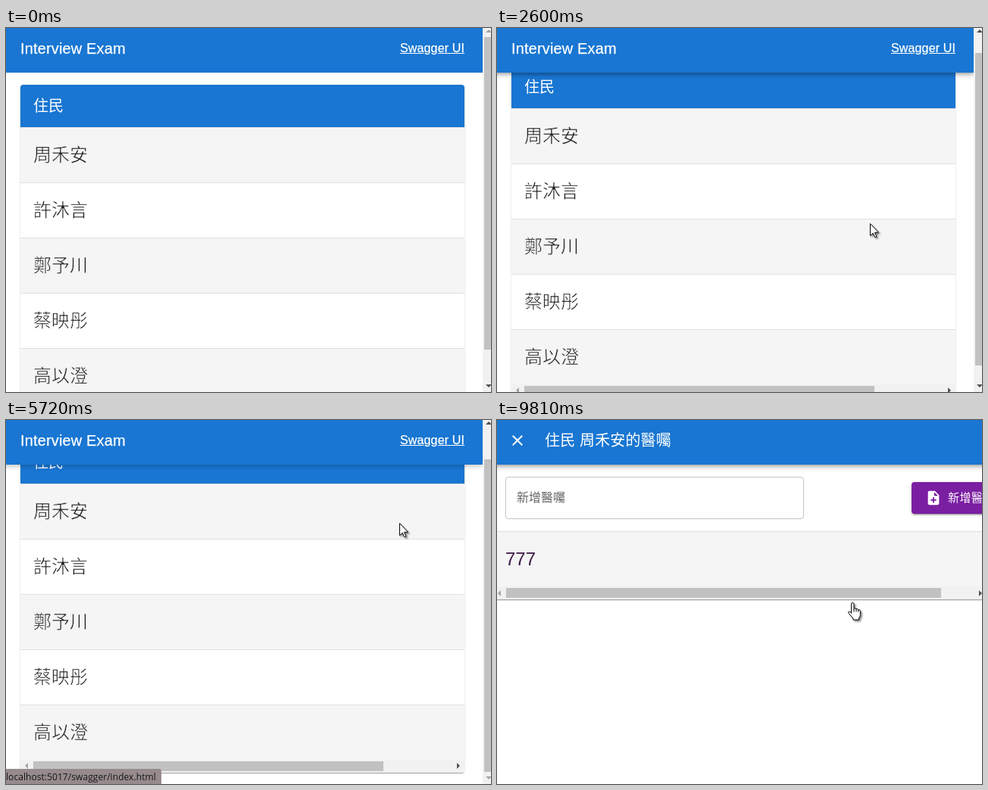
Animation, 640 px wide and 481 px high, one loop 9870 ms. Source, as an HTML page:

```html
<!DOCTYPE html>
<html lang="zh-Hant">
<head>
<meta charset="utf-8">
<title>Interview Exam</title>
<style>
  html, body { margin: 0; width: 100%; height: 100%; overflow: hidden; background: #fff; }
  #stage {
    position: relative; width: 640px; height: 481px; overflow: hidden; background: #fff;
    font: 300 24px "Liberation Sans", "Noto Sans CJK TC", sans-serif; color: rgba(0,0,0,.87);
  }
  #stage div, #stage svg { position: absolute; box-sizing: border-box; white-space: nowrap; }
  #page { width: 629px; height: 481px; overflow: hidden; }
  .bar { left: -20px; top: -20px; width: 649px; height: 79px; background: #1976d2; }
  .lift { box-shadow: 0 2px 4px -1px rgba(0,0,0,.2), 0 4px 5px rgba(0,0,0,.14), 0 1px 10px rgba(0,0,0,.12); }
  .title { top: 0; font-size: 20px; line-height: 54px; letter-spacing: .15px; color: #fff; }
  .link { left: 520px; top: 0; font-size: 16px; line-height: 53px; letter-spacing: .15px; color: #fff; text-decoration: underline; }
  .crisp { -webkit-text-stroke: .25px #fff; }
  .card { box-shadow: 0 2px 1px -1px rgba(0,0,0,.2), 0 1px 1px rgba(0,0,0,.14), 0 1px 3px rgba(0,0,0,.12); }
  #card, #cardEdge { left: 19px; top: 75px; width: 586px; height: 438px; border-radius: 4px; }
  #card { overflow: hidden; background: #fff; }
  #table { width: 700px; height: 421px; }
  .head { width: 700px; height: 57px; background: #1976d2; border-bottom: 1px solid #e0e0e0; color: #fff; font-size: 20px; line-height: 56px; }
  .row { --bg: #fff; width: 700px; height: 73px; background: var(--bg); border-bottom: 1px solid #e0e0e0; line-height: 72px; }
  .row:nth-child(even) { --bg: #f5f5f5; }
  .row:last-child { height: 72px; border: 0; }
  .cell { left: 17px; }
  /* a stroke in the row colour slims the glyphs to a light weight */
  .row .cell { color: #1c1c1c; -webkit-text-stroke: .6px var(--bg); }
  .halo { left: 644px; top: 16px; width: 40px; height: 40px; border-radius: 50%; background: rgba(0,0,0,.04); }
  .doc { left: 652px; top: 24px; fill: #757575; }
  .track { background: #f1f1f1; }
  .thumb { background: #c1c1c1; }
  .arrow { background: #505050; }
  .side { width: 4px; height: 8px; }
  .flat { left: 633px; width: 8px; height: 4px; }
  .up { clip-path: polygon(0 100%, 50% 0, 100% 100%); }
  .down { clip-path: polygon(0 0, 100% 0, 50% 100%); }
  .left { clip-path: polygon(100% 0, 0 50%, 100% 100%); }
  .right { clip-path: polygon(0 0, 100% 50%, 0 100%); }
  #status {
    left: 0; top: 461px; width: 205px; height: 20px; border-radius: 0 3px 0 0; background: #978a8d;
    color: #161616; font: 400 12px/21px "Open Sans", sans-serif; letter-spacing: .06px;
  }
  #shade { width: 640px; height: 481px; background: #000; }
  #dialog { width: 640px; height: 481px; background: #fff; overflow: hidden; }
  .field { left: 11px; top: 75px; width: 394px; height: 56px; border: 1px solid rgba(0,0,0,.23); border-radius: 4px; padding-left: 14px; font-size: 16px; line-height: 53px; color: rgba(0,0,0,.6); }
  .add {
    left: 547px; top: 82px; width: 137px; height: 42px; border-radius: 4px; background: #7b1fa2; color: #fff;
    font-size: 15px; line-height: 42px; letter-spacing: .4px; padding-left: 48px;
    box-shadow: 0 3px 1px -2px rgba(0,0,0,.2), 0 2px 2px rgba(0,0,0,.14), 0 1px 5px rgba(0,0,0,.12);
  }
  .order { left: -5px; top: 147px; width: 651px; height: 90px; border-top: 1px solid #e0e0e0; background: #f5f5f5; padding-left: 16px; line-height: 72px; color: #3f1a48; }
  #press { width: 30px; height: 30px; margin: -15px; border-radius: 50%; background: #ffff70; mix-blend-mode: multiply; }
  .cursor { overflow: visible; filter: drop-shadow(2px 2px 1.2px rgba(0,0,0,.45)); fill: #fff; stroke: #000; }
</style>
</head>
<body>
<div id="stage">
  <div id="page">
    <div id="cardEdge" class="card"></div>
    <div id="card">
      <div id="table"></div>
      <div class="track" style="top:421px;width:586px;height:17px"></div>
      <div id="hThumb" class="thumb" style="left:17px;top:423px;width:462px;height:13px"></div>
      <div id="hLeft" class="arrow side left" style="left:6px;top:425px"></div>
      <div id="hRight" class="arrow side right" style="left:576px;top:425px"></div>
    </div>
    <div id="barShadow" class="bar lift"></div>
    <div class="bar"></div>
    <div class="title crisp" style="left:19px">Interview Exam</div>
    <div class="link crisp">Swagger UI</div>
  </div>
  <div class="track" style="left:629px;width:17px;height:481px"></div>
  <div id="vThumb" class="thumb" style="left:631px;top:12px;width:13px;height:413px"></div>
  <div id="vUp" class="arrow flat up" style="top:2px"></div>
  <div id="vDown" class="arrow flat down" style="top:471px"></div>
  <div id="status">localhost:5017/swagger/index.html</div>
  <div id="shade"></div>
  <div id="dialog">
    <div class="bar lift" style="width:680px"></div>
    <svg style="left:20px;top:20px" width="14" height="14" stroke="#fff" stroke-width="2"><path d="M.7.7l12.6 12.6M13.3.7L.7 13.3"/></svg>
    <div class="title" id="dialogTitle" style="left:63px"></div>
    <div class="field">新增醫囑</div>
    <div class="add" id="add">新增醫囑</div>
    <div class="order card">777</div>
    <div class="track" style="top:220px;width:640px;height:17px"></div>
    <div class="thumb" style="left:12px;top:222px;width:574px;height:13px"></div>
    <div class="arrow side left" style="left:1px;top:225px;background:#a3a3a3"></div>
    <div class="arrow side right" style="left:636px;top:225px"></div>
  </div>
  <div id="press"></div>
  <svg id="arrow" class="cursor" width="14" height="20"><path d="M.5.5V16.6L4.2 13.1 6.8 18.8 9 17.8 6.5 12.2H11.6Z"/></svg>
  <svg id="hand" class="cursor" width="18" height="24"><path d="M4.6 14.5V2.1a1.7 1.7 0 0 1 3.4 0V8.2q1.7-1.1 3 .6 1.7-.9 2.8.9 2.6-.5 2.6 2V16.5q0 2.7-1.8 4.3V23H7V21Q4.6 18.4 1.2 14.6 0 12.6 1.6 11.9 3 11.7 4.6 14.5ZM8 8.2V12.5M11 8.8V12.5M13.8 9.7V12.7"/></svg>
</div>
<script>
const LOOP = 9870, TICK = 70, PHASE = 30;
const MAX_V = 47, MAX_H = 114, THUMB_RUN = 90, GRAB_X = 452;
const NAMES = ['周禾安', '許沐言', '鄭予川', '蔡映彤', '高以澄'];
const PAPER = 'M14 2H6a2 2 0 0 0-2 2v16a2 2 0 0 0 2 2h12a2 2 0 0 0 2-2V8zM13 9V3.5L18.5 9z';
const LINES = 'M8 12h8v2H8zM8 16h8v2H8z';
const PLUS = 'M11 11h2v3h3v2h-3v3h-2v-3H8v-2h3z';

const $ = id => document.getElementById(id);
const icon = (mark, size, attrs) =>
  `<svg ${attrs} width="${size}" height="${size}" viewBox="0 0 24 24"><path fill-rule="evenodd" d="${PAPER}${mark}"/></svg>`;

$('table').innerHTML =
  '<div class="head"><div class="cell">住民</div><div style="left:644px">醫囑</div></div>' +
  NAMES.map((name, i) =>
    `<div class="row" style="top:${57 + 73 * i}px"><div class="cell">${name}</div>` +
    (i ? '' : '<div class="halo" id="halo"></div>') + icon(LINES, 24, 'class="doc"') + '</div>').join('');
$('dialogTitle').textContent = `住民 ${NAMES[0]}的醫囑`;
$('add').innerHTML += icon(PLUS, 22, 'style="left:18px;top:10px" fill="#fff"');

// Each wheel turn runs to the opposite end of the page
const WHEEL_TURNS = [690, 1832, 2500, 3303, 5500], WHEEL_TIME = 160;

const ENTRY = { x: 598, y: 456 };
const MOVES = [
  { from: 180, to: 450, x: 492, y: 258 },
  { from: 3560, to: 4370, x: 540, y: 15 },
  { from: 5230, to: 5400, x: 519, y: 136 },
  { from: 5720, to: 6180, x: GRAB_X + 1, y: 448 },
  { from: 7060, to: 7690, x: 582, y: 450 },
  { from: 7900, to: 8180, x: 545, y: 106 },
  { from: 8380, to: 8580, x: 572, y: 112 },
  { from: 9200, to: 9810, x: 469, y: 241 }
];

const clamp = (v, a = 0, b = 1) => Math.min(b, Math.max(a, v));
const ramp = (t, a, b) => clamp((t - a) / (b - a));
const easeOut = (u, power) => 1 - (1 - u) ** power;
const show = (id, on) => { $(id).style.display = on ? '' : 'none'; };
const fade = (id, opacity) => { $(id).style.opacity = opacity; };
const shift = (id, x, y) => { $(id).style.transform = `translate(${Math.round(x)}px,${Math.round(y)}px)`; };
const ink = (id, active) => { $(id).style.background = active ? '#505050' : '#a3a3a3'; };

// The screen refreshes in fixed ticks
const snap = t => Math.max(0, Math.floor((t - PHASE) / TICK) * TICK + PHASE);

const scrollAt = t => Math.round(WHEEL_TURNS.reduce((y, start, i) =>
  y + (i % 2 ? -MAX_V : MAX_V) * easeOut(ramp(t, start, start + WHEEL_TIME), 2), 0));

function pointerAt(t) {
  let { x, y } = ENTRY;
  for (const m of MOVES) {
    const u = easeOut(ramp(t, m.from, m.to), 3);
    x += (m.x - x) * u;
    y += (m.y - y) * u;
  }
  const pull = Math.sin(Math.PI * ramp(t, 6720, 6950));
  return { x: x - 107 * pull, y: y + 6 * pull };
}

function draw(now) {
  const t = snap(now);
  const { x, y } = pointerAt(t);

  const scroll = scrollAt(t);
  shift('card', 0, -scroll);
  shift('cardEdge', 0, -scroll);
  shift('vThumb', 0, scroll * .85);
  ink('vUp', scroll > 0);
  ink('vDown', scroll < MAX_V);
  fade('barShadow', ramp(t, 730, 1000) - ramp(t, 3500, 3760) + ramp(t, 5560, 5800));

  const dragging = t >= 6720 && t < 7690;
  const run = t < 6720 ? 0 : clamp(t < 7690 ? x - GRAB_X : THUMB_RUN, 0, THUMB_RUN);
  shift('table', -run * MAX_H / THUMB_RUN, 0);
  shift('hThumb', run, 0);
  $('hThumb').style.background = dragging ? '#787878' : t >= 6260 && t < 7900 ? '#a8a8a8' : '#c1c1c1';
  ink('hLeft', run > 0);
  ink('hRight', run < THUMB_RUN);
  fade('halo', ramp(t, 8320, 8500));
  fade('status', t < 4930 ? 0 : 1 - ramp(t, 6190, 6385));

  const opening = ramp(t, 8930, 9170);
  show('shade', opening > 0);
  show('dialog', opening > 0);
  fade('shade', opening * .5);
  shift('dialog', 0, 481 * (1 - easeOut(opening, 3)));

  const hand = (t >= 4000 && t < 5230) || t >= 8380;
  show('arrow', t >= 180 && !hand);
  show('hand', hand);
  shift('arrow', x, y);
  shift('hand', x - 6, y);
  show('press', dragging || (t >= 8790 && t < 8950));
  shift('press', x, y);
}

const start = performance.now();
function tick() {
  draw((performance.now() - start) % LOOP);
  requestAnimationFrame(tick);
}
tick();
</script>
</body>
</html>
```
